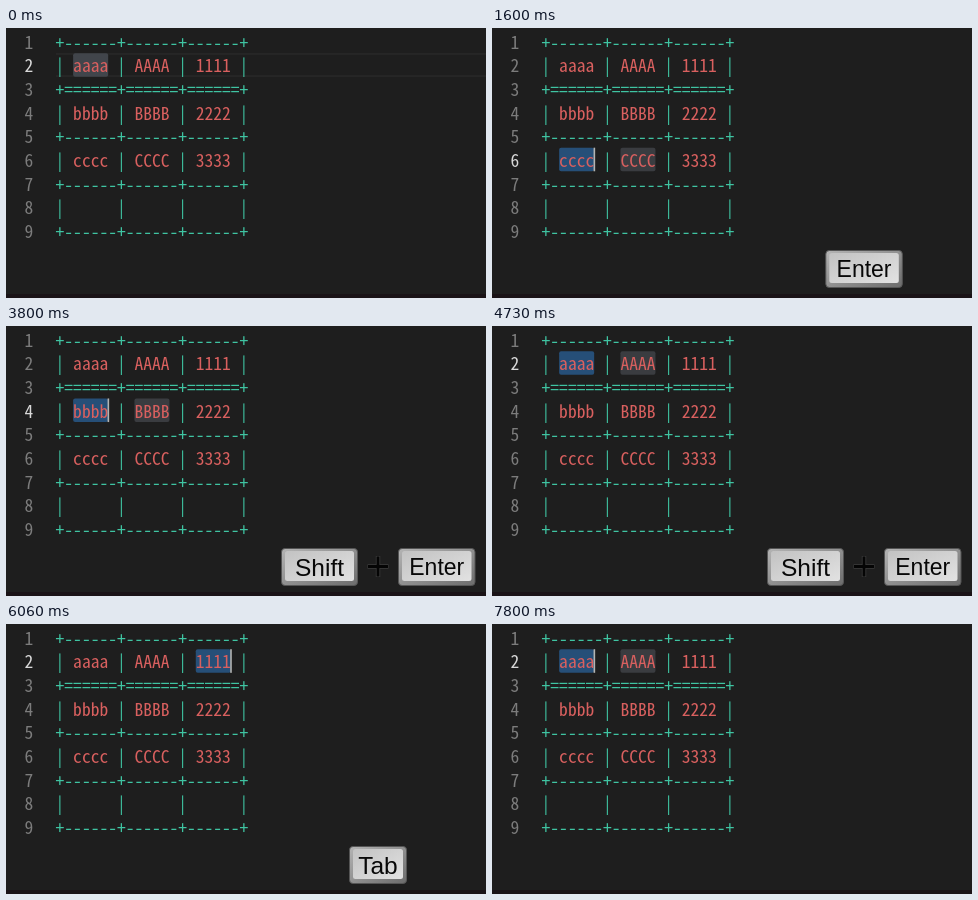
An HTML page for the animation above (8 s loop, 480x270 px).

```html
<!DOCTYPE html>
<html lang="en">
<head>
<meta charset="utf-8">
<title>Moving between table cells</title>
<style>
  html, body { margin: 0; width: 100%; height: 100%; overflow: hidden; background: #1e1e1e; }
  svg { display: block; width: 100vw; height: 100vh; }
  .code { font: 17.5px "Noto Sans Mono CJK JP", "Noto Sans CJK JP", "Noto Sans Mono", monospace; }
  .key { font-family: "Liberation Sans", Arial, sans-serif; text-anchor: middle; }
</style>
</head>
<body>
<svg id="stage" viewBox="0 0 480 270">
  <defs>
    <linearGradient id="edge" x1="0" y1="0" x2="1" y2="1">
      <stop offset="0" stop-color="#b4b4b4"/><stop offset="1" stop-color="#6c6c6c"/>
    </linearGradient>
    <linearGradient id="face" x1="0" y1="0" x2="1" y2="1">
      <stop offset="0" stop-color="#c2c2c2"/><stop offset="1" stop-color="#e2e2e2"/>
    </linearGradient>
  </defs>
  <rect width="480" height="270" fill="#1e1e1e"/>
  <rect y="266" width="480" height="4" fill="#1a1317"/>
</svg>
<script>
const LOOP = 8000, LEFT = 49.6, CHAR = 8.76, ROW = 23.62;
const TEAL = '#3fc4a2', RED = '#d9605f';
const stage = document.getElementById('stage');
const RULE = '+------+------+------+';
const LINES = [
  RULE, '| aaaa | AAAA | 1111 |', RULE.replace(/-/g, '='),
  '| bbbb | BBBB | 2222 |', RULE, '| cccc | CCCC | 3333 |',
  RULE, '|      |      |      |', RULE
];

const colX = c => LEFT + c * CHAR;
const rowY = r => 25.2 + (r - 2) * ROW;
const baseY = r => rowY(r) + 19.2;

function add(tag, attrs, parent = stage, text = '') {
  const el = document.createElementNS('http://www.w3.org/2000/svg', tag);
  for (const name in attrs) el.setAttribute(name, attrs[name]);
  el.textContent = text;
  parent.append(el);
  return el;
}
const show = (el, on) => el.setAttribute('visibility', on ? 'visible' : 'hidden');

// Layers behind the text
const lineMark = add('g', {});
const lineEdges = [0, 1].map(() => add('rect', { x: 50, width: 430, height: 1.5, fill: '#292929' }, lineMark));
const block = fill => add('rect', { width: 4 * CHAR, height: ROW, rx: 2, fill });
const match = block('#3a3c40');
const selection = block('#264f78');

// Table text
const numbers = LINES.map((line, i) => {
  const row = i + 1;
  const draw = (pattern, fill) => {
    for (const m of line.matchAll(pattern)) {
      const xs = [...m[0]].map((_, k) => colX(m.index + k).toFixed(2)).join(' ');
      add('text', { class: 'code', x: xs, y: baseY(row), fill }, stage, m[0]);
    }
  };
  draw(/[+|=-]+/g, TEAL);
  draw(/\w+/g, RED);
  return add('text', { class: 'code', x: 18.4, y: baseY(row) }, stage, row);
});
const caret = add('rect', { width: 1.6, height: ROW, fill: '#b4b5b3' });

// Key caps
function key(parent, x, width, label, size, base) {
  add('rect', { x: x + .5, y: 222.5, width: width - 1, height: 37, rx: 3.5, fill: 'url(#edge)', stroke: '#555' }, parent);
  add('rect', { x: x + 4, y: 225, width: width - 8, height: 30, rx: 2.5, fill: 'url(#face)' }, parent);
  add('text', { class: 'key', x: x + width / 2, y: base, 'font-size': size, fill: '#080808' }, parent, label);
}
const enterKey = (g, x) => key(g, x, 77.5, 'Enter', 23, 249.3);
const tabKey = (g, x) => key(g, x, 58, 'Tab', 24.5, 250.3);
function shiftPlus(g, x) {
  key(g, x, 77, 'Shift', 24.5, 250.3);
  add('path', { d: `M${x + 86.5} 240.5h21m-10.5-10.5v21`, stroke: '#3c3c3c', 'stroke-width': 4.4 }, g);
  add('path', { d: `M${x + 87} 240.5h20m-10-10v20`, stroke: '#050505', 'stroke-width': 2.8 }, g);
}
const combos = {
  enter: g => enterKey(g, 333.3),
  shiftEnter: g => { shiftPlus(g, 275); enterKey(g, 392); },
  tab: g => tabKey(g, 343),
  shiftTab: g => { shiftPlus(g, 284); tabKey(g, 401.5); }
};
const caps = {};
for (const name in combos) combos[name](caps[name] = add('g', {}));

// Start time and value of each step
const KEYS = [[0, ''], [860, 'enter'], [2930, ''], [3260, 'shiftEnter'], [5130, ''],
  [5600, 'tab'], [6200, ''], [7130, 'shiftTab'], [7800, '']];
const CELLS = [[0, '2-'], [1000, '4a'], [1600, '6a'], [2130, '8-'], [3460, '6a'], [3800, '4a'],
  [4200, '2a'], [5660, '2b'], [6060, '2c'], [7200, '2b'], [7530, '2a']];
const CARET = [[0, 0], [260, 1], [800, 0], [1000, 1], [1460, 0], [1600, 1], [2660, 0], [3130, 1],
  [4730, 0], [5260, 1], [6530, 0], [7060, 1]];
const at = (steps, t) => steps.findLast(step => step[0] <= t)[1];

function place(el, col, row) {
  el.setAttribute('x', colX(col));
  el.setAttribute('y', rowY(row));
}

function render(t) {
  const [digit, cell] = at(CELLS, t);
  const row = +digit, selected = cell !== '-';
  const col = { a: 2, b: 9, c: 16 }[cell] || 2;

  numbers.forEach((n, i) => n.setAttribute('fill', i + 1 === row ? '#d8d8d8' : '#7c7c7c'));
  show(lineMark, !selected);
  lineEdges.forEach((edge, i) => edge.setAttribute('y', rowY(row) + i * (ROW - 1.5)));

  show(selection, selected);
  place(selection, col, row);
  show(match, cell !== 'c' && row !== 8);
  place(match, selected ? 11 - col : 2, row);
  match.setAttribute('fill', selected ? '#3a3c40' : '#41454b');

  show(caret, at(CARET, t));
  place(caret, col + (selected ? 4 : 0), row);
  caret.setAttribute('x', colX(col + (selected ? 4 : 0)) - .6);

  const held = at(KEYS, t);
  for (const name in caps) show(caps[name], name === held);
}

const start = performance.now();
function tick() {
  render((performance.now() - start) % LOOP);
  requestAnimationFrame(tick);
}
render(0);
requestAnimationFrame(tick);
</script>
</body>
</html>
```
